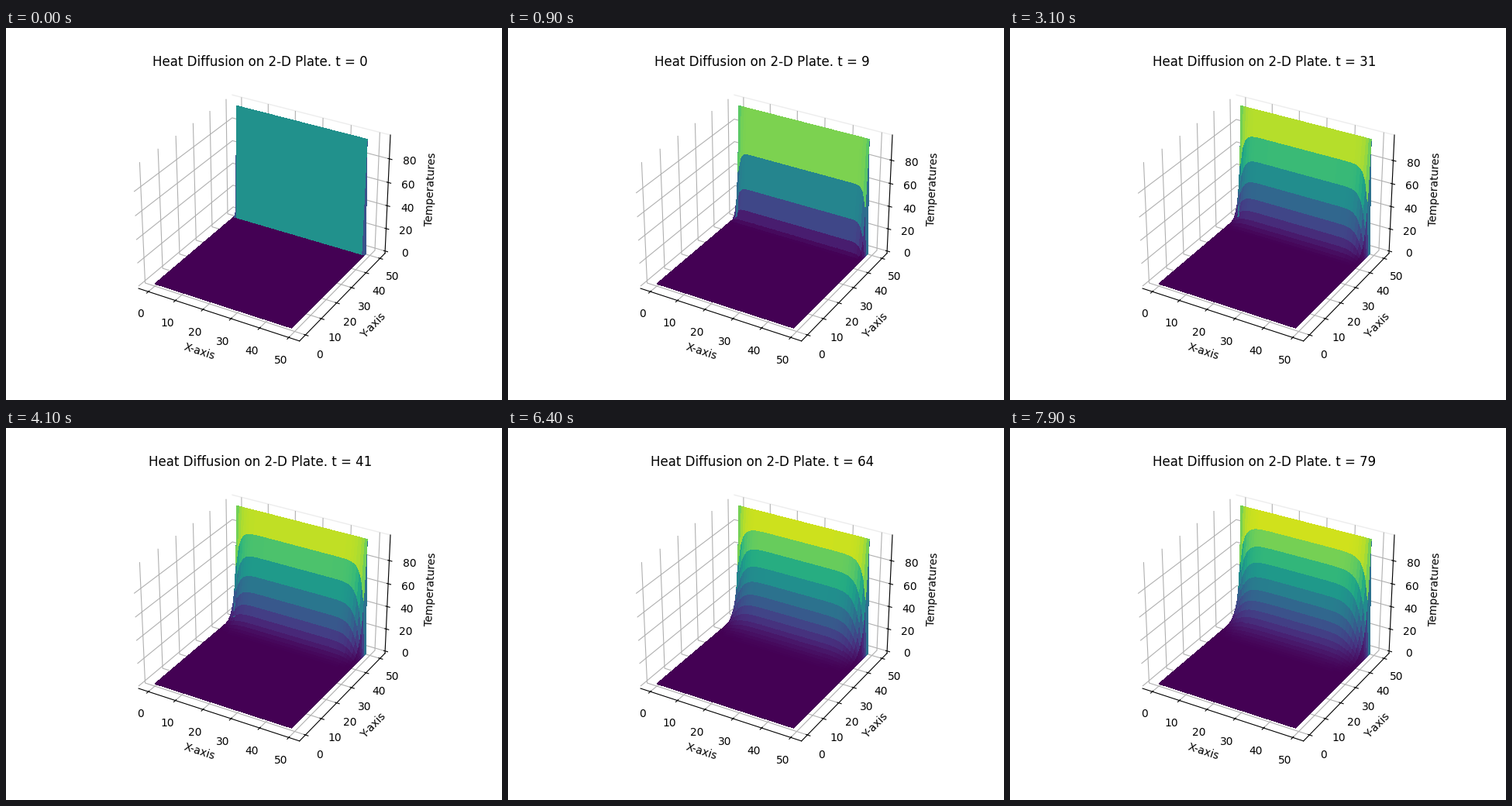
Recreate the animation shown at these times as a matplotlib script. Size 640x480 px, loop 8000 ms.

```python
import numpy as np
import matplotlib.pyplot as plt
from matplotlib.animation import FuncAnimation
from mpl_toolkits.mplot3d.art3d import Poly3DCollection

STEPS = 80
SIZE = 50          # nodes along each side of the plate
GAMMA = 0.2        # alpha * dt / dx**2
FLAT = 20          # rows below this one stay cold


def solve():
    """Explicit heat equation: one hot edge, three cold ones."""
    u = np.zeros((STEPS, SIZE, SIZE))
    u[:, -1, 1:-1] = 1
    for k in range(STEPS - 1):
        c = u[k]
        lap = (c[2:, 1:-1] + c[:-2, 1:-1] + c[1:-1, 2:] + c[1:-1, :-2]
               - 4 * c[1:-1, 1:-1])
        u[k + 1, 1:-1, 1:-1] = c[1:-1, 1:-1] + GAMMA * lap
    return u


def peak(t):
    """Temperature of the hot edge, creeping towards 100."""
    return 100 - 2.2 / np.sqrt(1 + 0.7 * t)


heat = solve()
rows = np.r_[0, FLAT:SIZE]
X, Y = np.meshgrid(np.arange(SIZE), rows)


def quads(z):
    p = np.stack([X, Y, z], axis=-1).astype(float)
    cells = [p[:-1, :-1], p[:-1, 1:], p[1:, 1:], p[1:, :-1]]
    return np.stack(cells, axis=2).reshape(-1, 4, 3)


fig = plt.figure(figsize=(6.4, 4.8), dpi=100)
ax = fig.add_subplot(projection="3d")
ax.set_xlabel("X-axis")
ax.set_ylabel("Y-axis")
ax.set_zlabel("Temperatures")

half = 25 * 1.1 * 25 / 24
ax.set_xlim(25 - half, 25 + half)
ax.set_ylim(25 - half, 25 + half)
ax.set_xticks(range(0, 51, 10))
ax.set_yticks(range(0, 51, 10))
ax.set_zticks(range(0, 81, 20))
for axis in (ax.xaxis, ax.yaxis, ax.zaxis):
    axis.set_pane_color((1, 1, 1, 1))
ax.yaxis.pane.set_edgecolor((0.93, 0.93, 0.93, 1))

surface = Poly3DCollection(quads(heat[0][rows]), cmap="viridis",
                           linewidths=0, antialiased=False)
surface.set_array(np.zeros((len(rows) - 1) * (SIZE - 1)))
ax.add_collection3d(surface)


def update(t):
    top = peak(t)
    cells = quads(top * heat[t][rows])
    surface.set_verts(cells)
    surface.set_array(cells[:, :, 2].mean(axis=1))
    surface.set_clim(0, top)
    ax.set_zlim(-top / 48, top * 49 / 48)
    ax.set_title(f"Heat Diffusion on 2-D Plate. t = {t}")
    return [surface]


anim = FuncAnimation(fig, update, frames=STEPS, interval=100,
                     repeat=True, repeat_delay=0, blit=False)
plt.show()
```
